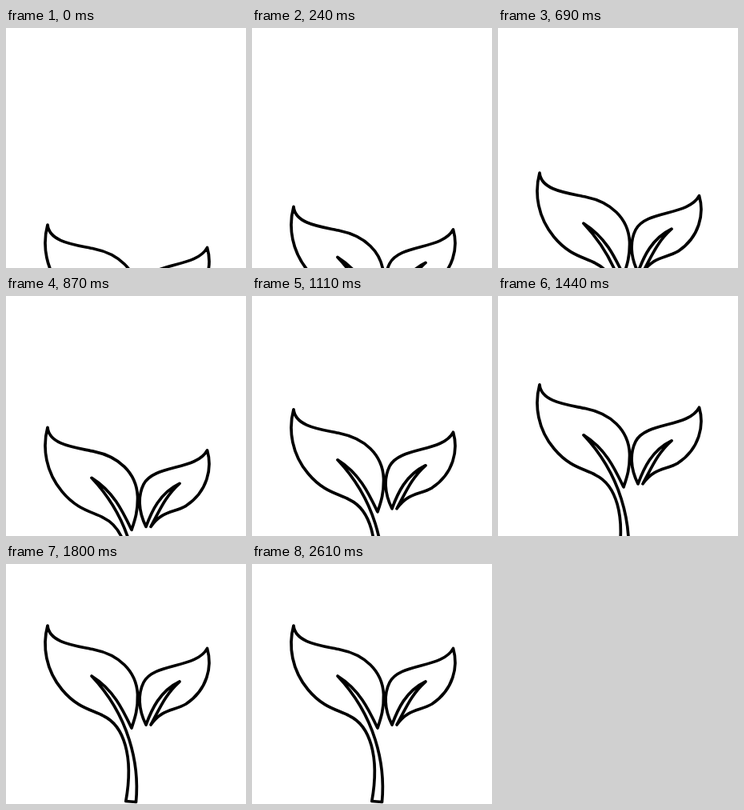
Write an HTML page with a canvas that moves like this. It is 300 px wide and 300 px high and loops after 2700 ms.

```html
<!DOCTYPE html>
<html lang="en">
<head>
<meta charset="utf-8">
<title>Sprout</title>
<style>
  html, body { margin: 0; width: 100%; height: 100%; overflow: hidden; background: #fff; }
  canvas { display: block; width: 100vw; height: 100vh; }
</style>
</head>
<body>
<canvas id="stage" width="300" height="300"></canvas>
<script>
const ctx = document.getElementById('stage').getContext('2d');
const LOOP = 2700, STEP = 30, RISE_END = 1800, RISE = 169;

// One closed outline: large leaf, stem, veins, small leaf
const sprout = new Path2D(`
  M52 77
  C45 103 50 133 70 157
  C90 181 108 182 122 190
  C147 202 160 240 149.8 296.5
  L162.5 297.5
  C167 250 154 190 107 140
  C134 157 145 180 157 205
  C161 193 165 182 164.5 163
  C163 133 140 113 110 107
  C87 102 54 99 52 77 Z
  M251.5 105.5
  C258 128 252 157 225 175
  C209 184 195 181 181 201
  C192 181 199 163 217 147
  C192 159 182 182 175 201
  C165 181 165 162 172 148
  C185 123 238 131 251.5 105.5 Z`);

function draw(t) {
  const time = Math.min(Math.floor(t / STEP) * STEP, RISE_END);
  const drop = RISE * (1 - time / RISE_END);
  ctx.setTransform(1, 0, 0, 1, 0, 0);
  ctx.fillStyle = '#fff';
  ctx.fillRect(0, 0, 300, 300);
  ctx.translate(0, drop);
  ctx.strokeStyle = '#000';
  ctx.lineWidth = 3.7;
  ctx.lineJoin = 'round';
  ctx.stroke(sprout);
}

const start = performance.now();
function tick() {
  draw((performance.now() - start) % LOOP);
  requestAnimationFrame(tick);
}
tick();
</script>
</body>
</html>
```
